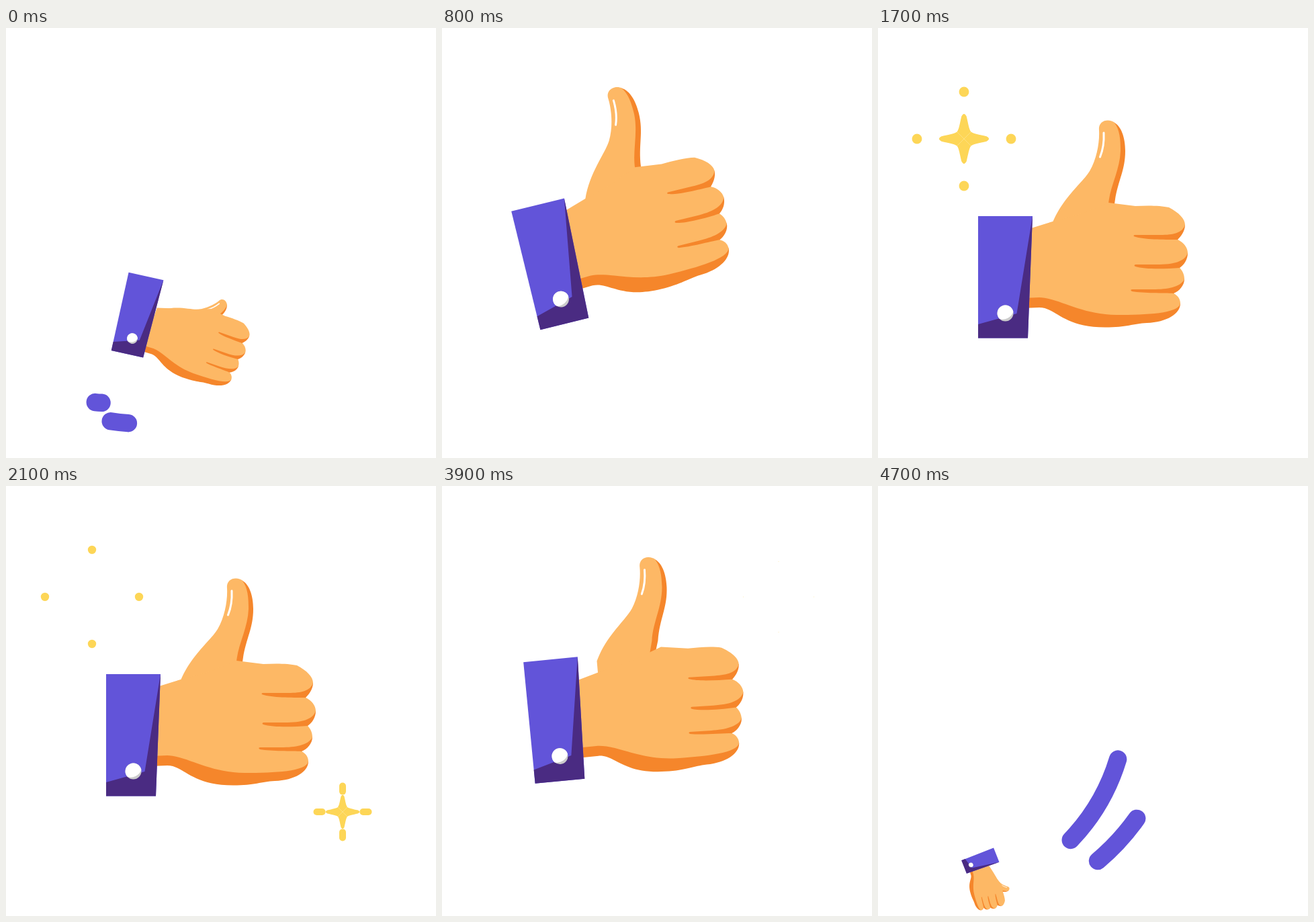
Animation, 640 px wide and 640 px high, one loop 4.8 s. Source, as an HTML page:

```html
<!DOCTYPE html>
<html lang="en">
<head>
<meta charset="utf-8">
<title>Thumbs up</title>
<style>
  html, body { margin: 0; width: 100%; height: 100%; overflow: hidden; background: #fff; }
  svg { display: block; width: 100%; height: 100%; }
  .skin { fill: #fdb865; }
  .shade { fill: #f5862b; }
  .swoosh { fill: none; stroke: #6254d9; stroke-width: 26.5; stroke-linecap: round; }
  .star { fill: #fdd657; stroke: #fdd657; stroke-linecap: round; }
</style>
</head>
<body>
<svg viewBox="0 0 640 640">
  <g id="swooshes"></g>
  <g id="arm">
    <g id="thumb">
      <path class="shade" d="M350 140C362 145 368 163 368 183C368 214 356 228 352 262L345 290L320 260Z"/>
      <path class="skin" d="M329 152C328 143 334 137.500 342 137.500C346 137.500 350 139 352 141C360 152 361 166 361 183C360 212 345 236 343 262L335 300L290 315L262 330L260 289C276 251 304 231 315 213C326 194 330 169 329 152Z"/>
      <path d="M336 156Q337 176 330.500 192" fill="none" stroke="#fff" stroke-width="3" stroke-linecap="round"/>
    </g>
    <g id="palm">
      <path class="shade" d="M215 330L433 290L457 293C457 303 450 311 446 315L461 335C461 345 455 353 449 357L456 374C456 383 448 392 440 395L450 410C450 425 430 438 400 439C380 440 370 445.500 338 445.500C275 445.500 265 416 240 416L215 417Z"/>
      <path class="skin" d="M215 302L260 288L301 277L343 260L383 265C400 264 420 264 433 267C448 275 457 284 457 293C453 305 440 308 420 308L382 308Q379 309 382 310.500C395 315 425 315 446 315C455 319 461 327 461 335C456 348 440 352 415 352L383 352Q380 353.500 383 355C395 359 425 359 449 357C454 362 456 368 456 374C450 386 430 389 410 389L378 389Q374.500 390 378 392C395 395 425 394 440 395C446 398 450 403 450 410C447 425 400 427 355 427C300 426 270 402 240 401L215 402Z"/>
    </g>
    <path fill="#6254d9" d="M149 280H230L223 461.500H149Z"/>
    <path fill="#4a2b82" d="M230 280L223 461.500H149V441L206.500 425Z"/>
    <circle id="button" cx="189.500" cy="424.500" r="12"/>
    <path id="gloss" fill="#fff" d="M201.400 422.500A12 12 0 1 0 181 433A17 17 0 0 0 201.400 422.500Z"/>
  </g>
  <g id="stars"></g>
</svg>
<script>
const LOOP = 4800, STEP = 100;
const $ = id => document.getElementById(id);
const clamp = u => Math.max(0, Math.min(1, u));
const lerp = (a, b, u) => a + (b - a) * u;
const easeIn = u => u * u;
const easeOut = u => 1 - (1 - u) * (1 - u);
const smooth = u => u * u * (3 - 2 * u);
const progress = (t, start, duration) => clamp((t - start) / duration);

function add(parent, name, attrs) {
  const el = document.createElementNS('http://www.w3.org/2000/svg', name);
  for (const key in attrs) el.setAttribute(key, attrs[key]);
  return parent.appendChild(el);
}

function place(id, pivot, x, y, turn, size) {
  $(id).setAttribute('transform',
    `translate(${x} ${y}) rotate(${turn}) scale(${size}) translate(${-pivot.x} ${-pivot.y})`);
}

// Arm poses are placed by the middle of the cuff.
const REST = { x: 187.75, y: 370.5, turn: 0, size: 1 };
const ENTER = { x: 194.5, y: 427.25, turn: 12.5, size: .656 };
const RAISED = { x: 142.8, y: 324.5, turn: -24.4, size: 1 };
const DIP = { ...REST, y: 386.5 };
const LIFT = { x: 118, y: 291, turn: -20, size: 1 };
const AWAY = { x: 152.25, y: 558, turn: 68.5, size: .283 };
const PALM = { x: 340, y: 350 }, THUMB = { x: 345, y: 190 };

const moves = [
  { start: 0, end: 480, a: ENTER, b: RAISED, ease: easeOut, drag: 0 },
  { start: 480, end: 1180, a: RAISED, b: DIP, ease: smooth, drag: 0 },
  { start: 1180, end: 1600, a: DIP, b: REST, ease: smooth, drag: 0 },
  { start: 3720, end: 4240, a: REST, b: LIFT, ease: smooth, drag: 1.1 },
  { start: 4240, end: 4700, a: LIFT, b: AWAY, ease: easeIn, drag: 0 }
];

function drawArm(t) {
  const { start, end, a, b, ease, drag } = moves.filter(m => m.start <= t).pop();
  const u = progress(t, start, end - start);
  const [x, y, turn, size] = ['x', 'y', 'turn', 'size'].map(k => lerp(a[k], b[k], ease(u)));
  place('arm', REST, x, y, turn, size);

  // The hand folds while it is small and trails behind the cuff on the way up.
  const fold = Math.max(0, 1 - t / 800, (t - 4240) / 500);
  const lag = drag * 4 * u * (1 - u);
  place('palm', PALM, PALM.x - 3.6 * fold + 9 * lag, PALM.y + 51 * fold ** 2 + 17 * lag,
    6.7 * fold + 1.9 * lag, 1 - .095 * fold ** 2);
  place('thumb', THUMB, THUMB.x + 77 * fold - 70 * fold ** 2 + 3.7 * lag,
    THUMB.y + 160 * fold - 20 * fold ** 2 + 5 * lag, 42 * fold + 3.4 * lag, 1 - .19 * fold ** 4);
}

// Each stroke runs along a circle between two angles; its tail follows its head.
const swooshes = [
  { x: 199.5, y: 309, r: 279.7, from: 99, to: 28, head: [-29, 749], tail: [103, 645] },
  { x: 156.3, y: 312.6, r: 245.6, from: 95.5, to: 45, head: [-12, 524], tail: [60, 507] },
  { x: 70, y: 319.5, r: 300, from: 0, to: 48.9, head: [4430, 400], tail: [4500, 506] },
  { x: 108, y: 298, r: 340, from: 20, to: 53, head: [4492, 300], tail: [4530, 356] }
].map(s => ({ ...s, el: add($('swooshes'), 'path', { class: 'swoosh' }) }));

function drawSwoosh({ x, y, r, from, to, head, tail, el }, t) {
  const front = lerp(from, to, easeOut(progress(t, ...head)));
  const back = lerp(from, to, smooth(progress(t, ...tail)));
  el.style.display = Math.abs(front - back) > .01 ? '' : 'none';
  const point = angle => {
    const rad = angle * Math.PI / 180;
    return `${x + r * Math.cos(rad)} ${y + r * Math.sin(rad)}`;
  };
  el.setAttribute('d', `M${point(back)}A${r} ${r} 0 0 ${to > from ? 1 : 0} ${point(front)}`);
}

const RADIUS = 70, STAR_LIFE = 1340;
const RAY = 'M-28-28C-20-38-17-60-10-90Q0-109 10-90C17-60 20-38 28-28L0 0Z';
const rayLength = age => 45 * Math.sin(Math.PI * clamp(age / 900)) ** 1.3;

const stars = [
  { x: 128, y: 165, size: 1, start: 1100 },
  { x: 501, y: 485, size: 1, start: 1900 },
  { x: 184, y: 424, size: .75, start: 2450 },
  { x: 501, y: 165, size: .75, start: 2570 }
].map(({ x, y, size, start }) => {
  const el = add($('stars'), 'g', { class: 'star', transform: `translate(${x} ${y}) scale(${size})` });
  const core = add(el, 'g', {}), dashes = [];
  for (let turn = 0; turn < 360; turn += 90) {
    const transform = `rotate(${turn})`;
    add(core, 'path', { d: RAY, transform, stroke: 'none' });
    dashes.push(add(el, 'path', { transform }));
  }
  return { el, core, dashes, start };
});

function drawStar({ el, core, dashes, start }, t) {
  const age = t - start;
  const shown = age > 0 && age < STAR_LIFE;
  el.style.display = shown ? '' : 'none';
  if (!shown) return;
  const inner = Math.min(RADIUS, .152 * age);
  const outer = Math.max(inner, Math.min(RADIUS, .235 * age - 8.5));
  const width = 15 * clamp(age / 300) * (1 - (age / STAR_LIFE) ** 6);
  core.setAttribute('transform', `scale(${rayLength(age) / 100})`);
  for (const dash of dashes) {
    dash.setAttribute('d', `M0 ${-inner}V${-outer - .01}`);
    dash.setAttribute('stroke-width', width);
  }
}

function draw(t) {
  drawArm(t);
  swooshes.forEach(s => drawSwoosh(s, t));
  stars.forEach(s => drawStar(s, t));
  const glint = rayLength(t - stars[2].start) > 10;
  $('button').setAttribute('fill', glint ? '#fdd657' : '#cbcbcb');
  $('gloss').style.display = glint ? 'none' : '';
}

const began = performance.now();
function tick() {
  const t = (performance.now() - began) % LOOP;
  draw(Math.floor(t / STEP) * STEP);
  requestAnimationFrame(tick);
}
tick();
</script>
</body>
</html>
```
